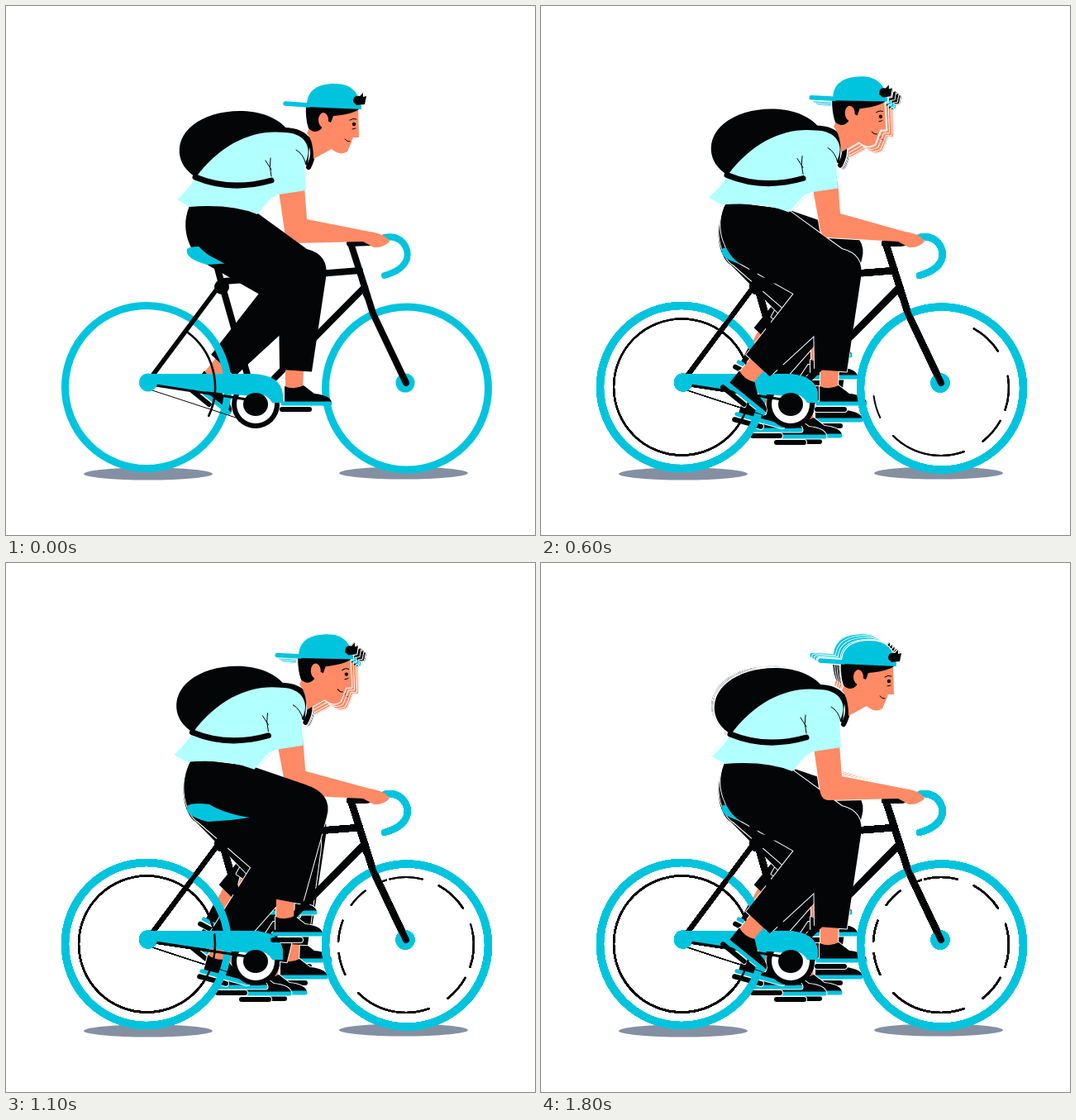
These frames come from a looping animation (640x640 px, 1.9 s). An HTML page with a canvas:

```html
<!DOCTYPE html>
<html lang="en">
<head>
<meta charset="utf-8">
<title>Cyclist</title>
<style>
html, body { margin: 0; width: 100%; height: 100%; overflow: hidden; background: #fff; }
canvas { display: block; width: 640px; height: 640px; }
</style>
</head>
<body>
<canvas id="stage" width="640" height="640"></canvas>
<script>
const ctx = document.getElementById('stage').getContext('2d');
const CYAN = '#00c4de', BLACK = '#030507', SKIN = '#ff8a65', SHIRT = '#b2ffff', SHADE = '#8490a2';
const STEP = 100, STEPS = 19;
const RAD = Math.PI / 180;

// Sole centre and tilt (degrees) for every 30 degrees of crank rotation.
const PEDAL = [
  [363, 481, 0], [358, 501, 0], [333, 520, 0], [314, 521, 0], [285, 513, 0], [264, 501, 15],
  [247, 474, 39], [264, 444, 28], [297, 429, 14], [325, 424, 5], [345, 423, 0], [352, 449, 0]
];
// How far the upper body is raised at each step.
const LIFT = [0, .1, .3, .6, .9, 1, 1, 1, 1, 1, .97, .9, .65, .4, .15, 0, 0, 0, 0];
// Speed marks inside the wheels: first step, start and end angle.
const FRONT_MARKS = [
  [1, -61, -33], [2, -10, 19], [3, 29, 52], [4, 70, 98], [5, 99, 135],
  [6, 154, 173], [7, 183, 201], [8, 216, 233], [8, 244, 253], [9, 256, 284], [10, -18, -8]
];
const REAR_MARKS = [[0, -54, 25], [1, 20, 140], [2, 135, 250], [2, -97, -50], [3, 0, 360]];

let halo = false;

function fill(d, color) {
  const path = typeof d === 'string' ? new Path2D(d) : d;
  if (halo) {
    ctx.strokeStyle = '#fff';
    ctx.lineWidth = 2;
    ctx.stroke(path);
  } else {
    ctx.fillStyle = color;
    ctx.fill(path);
  }
}

function line(d, width, color = BLACK) {
  ctx.lineWidth = halo ? width + 2 : width;
  ctx.strokeStyle = halo ? '#fff' : color;
  ctx.stroke(new Path2D(d));
}

function oval(x, y, rx, ry, color) {
  const path = new Path2D();
  path.ellipse(x, y, rx, ry, 0, 0, 7);
  fill(path, color);
}

function ring(x, y, r, width, color, from = 0, to = 360) {
  ctx.lineWidth = width;
  ctx.strokeStyle = color;
  ctx.beginPath();
  ctx.arc(x, y, r, from * RAD, to * RAD);
  ctx.stroke();
}

function leg(phase) {
  const [px, py, tilt] = PEDAL[phase % 12];
  const c = Math.cos(tilt * RAD), s = Math.sin(tilt * RAD);
  const ax = px - 13 * c + 40 * s, ay = py - 13 * s - 40 * c;

  ctx.save();
  ctx.translate(px, py);
  ctx.rotate(tilt * RAD);
  line('M-29 7H4', 6);
  fill('M-25-43L-3-43L-4-18L-25-18Z', SKIN);
  fill('M-26-21Q-14-16-3-22L10-12Q30-10 31-1L-26-1Z', BLACK);
  line('M-28 0H29', 5, CYAN);
  ctx.restore();

  // Two-bone reach from the hip to the ankle; the thigh never rises above level.
  const hx = 252, hy = 289, thigh = 110, shin = 127;
  const dx = ax - hx, dy = ay - hy, d = Math.hypot(dx, dy);
  const bend = Math.acos((thigh * thigh + d * d - shin * shin) / (2 * thigh * d));
  const a = Math.max(0, Math.atan2(dy, dx) - bend);
  const kx = hx + thigh * Math.cos(a), ky = hy + thigh * Math.sin(a);
  const len = Math.hypot(ax - kx, ay - ky);
  const ux = (ax - kx) / len, uy = (ay - ky) / len;
  const at = (x, y, along, side) => [x + ux * along + uy * side, y + uy * along - ux * side];
  const sag = 5 + 42 * Math.sin(a);
  const under = [hx - Math.sin(a) * sag, hy + Math.cos(a) * sag];
  const kneeTop = [kx + 21 * Math.sin(a), ky - 21 * Math.cos(a)];
  const front = at(kx, ky, 12, 29), hemFront = at(ax, ay, 0, 20);
  const hemBack = at(ax, ay, 0, -19), back = at(kx, ky, 34, -27);

  const p = new Path2D();
  p.moveTo(225, 237);
  p.lineTo(298, 246);
  p.lineTo(...kneeTop);
  p.quadraticCurveTo(...at(kx, ky, -16, 31), ...front);
  p.lineTo(...hemFront);
  p.lineTo(...hemBack);
  p.lineTo(...back);
  p.lineTo(...under);
  p.bezierCurveTo(under[0] - 14, under[1] - 8, 206, 268, 225, 237);
  p.closePath();
  fill(p, BLACK);
}

function shadows() {
  oval(172, 566, 78, 7.5, SHADE);
  oval(481, 565, 78, 7.5, SHADE);
}

function wheels(step) {
  for (const [first, from, to] of REAR_MARKS)
    if (step >= first) ring(170.5, 461, 82.5, 2, BLACK, from, to);
  for (const [first, from, to] of FRONT_MARKS)
    if (step >= first) ring(484, 462, 82, 2, BLACK, from, to);
  ring(170, 461, 98.5, 9, CYAN);
  ring(485, 462.5, 98.5, 9, CYAN);
}

function bike(step) {
  line('M254 310L262 340L292 446', 8);
  line('M264 333L428 320', 8);
  line('M178 446L257 340', 5.5);
  line('M434 340L325 450', 8);
  oval(261, 340, 9, 9, BLACK);

  oval(302, 482, 29, 29, BLACK);
  oval(302, 482, 23, 23, '#fff');
  line('M177 465L278 498', 1);
  fill('M172 445H297Q333 446 335 470V480H322Q313 465 296 472L172 459Z', CYAN);
  line('M181 459L298 477', 3);
  oval(302, 482, 15, 14, BLACK);
  oval(172, 455.5, 11, 11, CYAN);
  if (step !== 1) ring(170.5, 461, 82.5, 2.5, BLACK, step ? -8 : -54, step ? 8 : 25);

  oval(483, 456, 11.5, 11.5, CYAN);
  line('M417 287L434 340L444 372L484 456', 8);
  fill('M424 317L438 345L444 372L432 350Z', BLACK);
  line('M416 287L440 286', 8);
  line('M458 280C479 276 488 293 485 306Q480 320 458 326', 8, CYAN);
  fill('M219 294Q225 289 246 292Q264 303 295 308Q270 312 244 313Q216 306 219 294Z', CYAN);
}

function torso(lift) {
  ctx.save();
  ctx.translate(-4 * lift, -2.5 * lift);
  fill('M230 207C205 193 203 163 225 145C254 121 316 120 340 149L368 159L365 194L335 166Z', BLACK);
  line('M336 150C365 150 379 171 366 195', 6);
  fill('M230 207C260 166 300 149 336 153C361 153 373 171 361 192L363 223L330 228Q321 231 315 239L304 252Q272 239 222 243L207 234Q220 223 230 207Z', SHIRT);
  line('M229 207Q272 225 321 211', 7);
  if (!halo) {
    line('M314 187L321 198M320 184Q318 194 321 206', 1);
    line('M351 174Q360 179 363 192', 1);
  }
  ctx.restore();
}

function arm(lift) {
  const up = y => y - 7 * lift, side = x => x - 2 * lift;
  fill(`M${side(330)} ${up(224)}L${side(361)} ${up(219)}L${side(364)} ${up(258)}
    L440 273Q460 276 464 285Q456 293 445 292L432 285
    L347 ${up(287)}Q338 ${up(286)} 337 ${up(272)}Z`, SKIN);
}

function head(lift) {
  ctx.save();
  ctx.translate(390 - 10 * lift, 150 - 8.5 * lift);
  ctx.rotate(-1.5 * lift * RAD);
  ctx.translate(-390, -150);
  fill('M376 126L426 123L427 159L420 159L417 167L413 176Q404 182 394 173L372 185Q372 163 364 154Z', SKIN);
  fill('M363 119L430 121Q427 130 396 133L393 141L383 136L382 148Q374 156 366 148Q362 137 363 119Z', BLACK);
  oval(384, 138, 6, 9, SKIN);
  line('M338 118L366 120', 5.5, CYAN);
  fill('M364 122C363 100 380 94 398 94C418 94 428 105 430 125L364 122Z', CYAN);
  fill('M420 116Q420 107 428 109L432 105L432 110L436 109L434 119L424 120Z', BLACK);
  if (!halo) {
    oval(421, 143, 2.2, 2.2, BLACK);
    line('M416 138Q420 135 424 137M419 149L423 148', 1);
    line('M410 161Q413 165 416 164', 1);
  }
  ctx.restore();
}

function pose(step) {
  const lift = LIFT[step];
  const rider = () => { arm(lift); leg(step); torso(lift); head(lift); };
  // Earlier poses stay visible, parted by a thin white rim.
  halo = true;
  leg(step + 6);
  rider();
  halo = false;
  leg(step + 6);
  wheels(step);
  bike(step);
  rider();
}

let shown = -1;
function tick(now) {
  const step = Math.floor(now % (STEP * STEPS) / STEP);
  if (step !== shown) {
    shown = step;
    ctx.fillStyle = '#fff';
    ctx.fillRect(0, 0, 640, 640);
    ctx.lineCap = 'round';
    ctx.lineJoin = 'round';
    shadows();
    for (let i = 0; i <= step; i++) pose(i);
  }
  requestAnimationFrame(t => tick(Math.max(0, t - start)));
}
const start = performance.now();
tick(0);
</script>
</body>
</html>
```
